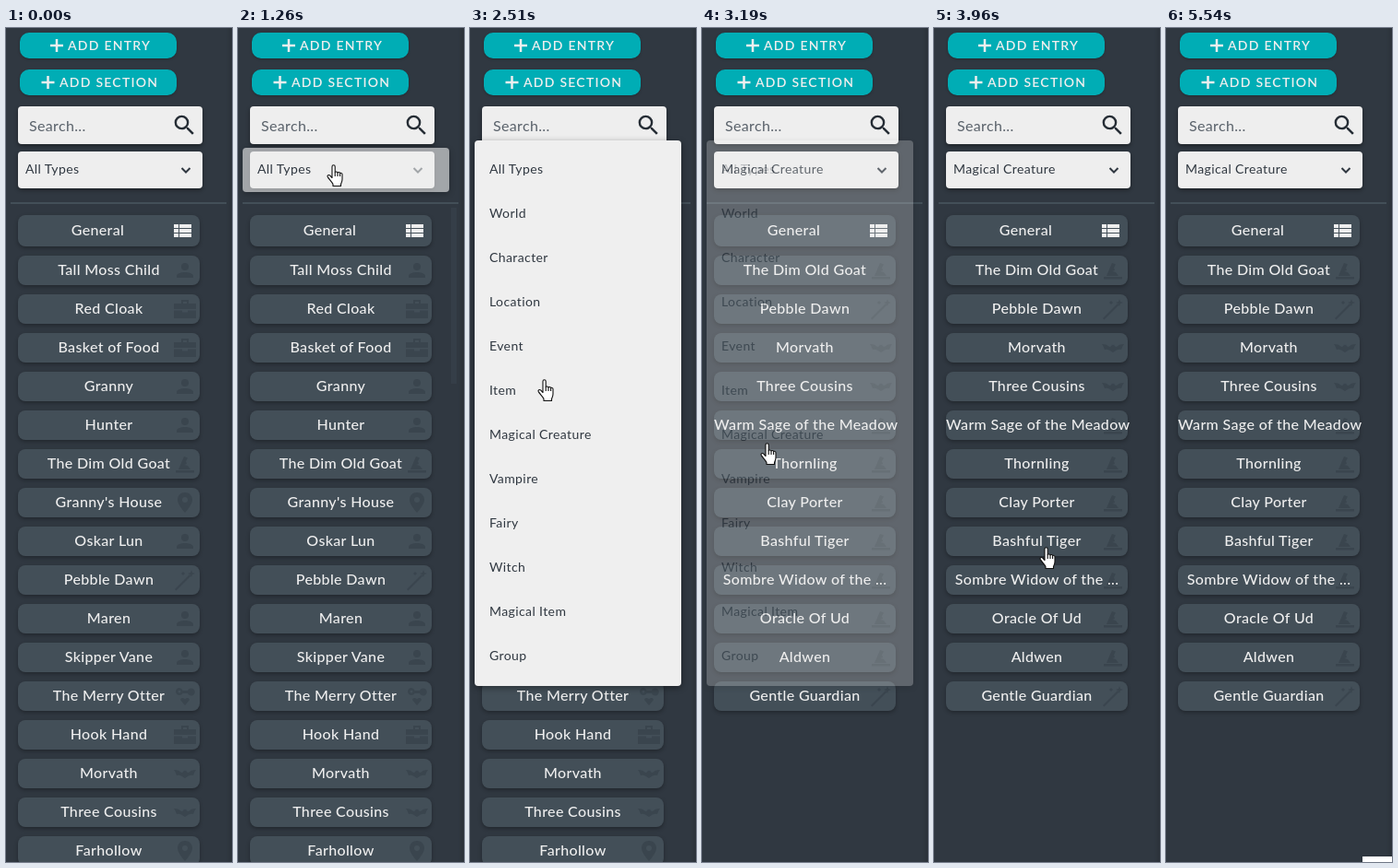
These frames come from a looping animation (245x905 px, 5.59 s). An HTML page:

```html
<!DOCTYPE html>
<html lang="en">
<head>
<meta charset="utf-8">
<title>Entry filter</title>
<style>
html, body { margin: 0; width: 100%; height: 100%; overflow: hidden; background: #303841; }
#stage { position: relative; width: 245px; height: 905px; overflow: hidden; background: #303841;
  box-shadow: inset -5px 0 5px -4px rgba(0,0,0,.2);
  font: 16px Lato, Nunito, sans-serif; letter-spacing: .35px; color: #eee; white-space: nowrap; }
#stage div, #stage svg { position: absolute; box-sizing: border-box; }
svg { overflow: visible; }
.btn { left: 15px; width: 170px; height: 28px; border-radius: 10px; background: #00adb5;
  font-size: 14px; font-weight: 600; letter-spacing: 1.25px; line-height: 27px;
  box-shadow: 0 1px 3px rgba(0,0,0,.25); }
.field { left: 13px; width: 200px; background: #eee; border-radius: 4px; color: #303841;
  box-shadow: 0 2px 4px rgba(0,0,0,.4); }
.small { font-size: 14px; letter-spacing: .4px; }
.row { left: 13px; width: 197px; height: 32px; border-radius: 8px; background: #434f58;
  text-align: center; line-height: 30px; font-weight: 500; box-shadow: 0 2px 4px rgba(0,0,0,.3); }
.row svg { left: 169px; top: 4px; fill: #3a454e; }
.row span { position: relative; }
#rule { left: 5px; top: 189px; width: 234px; height: 2px; background: #434f58; }
#thumb { left: 231px; top: 195px; width: 6px; height: 191px; background: #353e48; }
#menu { left: 5px; width: 224px; overflow: hidden; background: #efefef; border-radius: 4px;
  color: #303841; box-shadow: 0 2px 7px rgba(0,0,0,.4); }
#menu .opt { left: 16px; line-height: 46px; height: 48px; }
#tip { left: 213px; top: 899px; width: 40px; height: 20px; background: #fff; }
.cursor { left: 0; top: 0; fill: #fff; stroke: #111; stroke-width: 1.1; stroke-linejoin: round; }
</style>
</head>
<body>
<div id="stage">
  <div class="btn" style="top:5px"><div style="left:52px">ADD ENTRY</div>
    <svg width="170" height="28"><path d="M33 14h14M40 7v14" stroke="#eee" stroke-width="2.5"/></svg></div>
  <div class="btn" style="top:45px"><div style="left:43px">ADD SECTION</div>
    <svg width="170" height="28"><path d="M23.5 14h14M30.5 7v14" stroke="#eee" stroke-width="2.5"/></svg></div>

  <div class="field" style="top:85px;height:41px;line-height:41px;color:#59616a">
    <div style="left:12px">Search...</div>
    <svg style="left:166.4px;top:6px" width="29" height="29" viewBox="0 0 24 24" fill="#262d35"><path d="M15.5 14h-.79l-.28-.27A6.47 6.47 0 0 0 16 9.5 6.5 6.5 0 1 0 9.5 16c1.61 0 3.09-.59 4.23-1.57l.27.28v.79l5 4.99L20.49 19zm-6 0a4.5 4.5 0 1 1 0-9 4.5 4.5 0 0 1 0 9z"/></svg>
  </div>
  <div class="field small" style="top:134px;height:40px;line-height:38px">
    <div id="picked" style="left:8px"></div>
    <svg width="200" height="40"><path d="M177.5 18l4.5 4.5 4.5-4.5" fill="none" stroke="#303841" stroke-width="2"/></svg>
  </div>
  <div id="rule"></div>
  <div id="thumb"></div>

  <div class="row" style="top:203px;height:34px;line-height:32px">
    <div style="width:173px">General</div>
    <svg style="top:10px;fill:#eee" width="20" height="14"><path d="M0 0h5v4H0zM6 0h13v4H6zM0 5h5v4H0zM6 5h13v4H6zM0 10h5v4H0zM6 10h13v4H6z"/></svg>
  </div>
  <div id="all"></div>
  <div id="filtered"></div>

  <div id="menu" class="small"><div id="options"></div></div>
  <svg id="hand" class="cursor" width="18" height="24"><path d="M6 14.5V2.4a1.6 1.6 0 0 1 3.2 0V8.6c.4-1 2.6-.8 2.8.4.5-.9 2.4-.6 2.6.6.6-.6 2.4-.3 2.4 1.2V16c0 3-1 4-1.5 5.5v2H7v-2C6 19 3.5 17 1.2 13.6c-.8-1.6 1.2-2.8 2.6-1.4z"/><path d="M9.2 8.5v4.5M12 9v4M14.6 9.8v3.2" fill="none"/></svg>
  <svg id="arrow" class="cursor" width="12" height="20"><path d="M.5.5v15l3.6-3.3 2.6 6.3 2.2-1-2.6-6h5z"/></svg>
  <div id="tip"></div>
</div>
<script>
const $ = id => document.getElementById(id);
const LOOP = 5590, TICK = 77.5, START = 310;

const icons = {
  person: 'M12 12a4 4 0 1 0 0-8 4 4 0 0 0 0 8zm0 2c-3.4 0-9 1.3-9 4v2h18v-2c0-2.7-5.6-4-9-4z',
  bag: 'M8 6V2h8v4h8v6H0V6zm2 0h4V4h-4zM0 13.5h9v2h6v-2h9V22H0z',
  hat: 'M2 19h20v2.5H2zM5 18l6-14 4 1.5-2 3.5 1 3-3 1 4 1 3 4z',
  pin: 'M12 1C7.5 1 4 4.5 4 9c0 5.5 8 14 8 14s8-8.5 8-14c0-4.5-3.5-8-8-8zm0 11a3 3 0 1 1 0-6 3 3 0 0 1 0 6z',
  wand: 'M1 22L17 6l1.5 1.5L2.5 23.5zM19 1l1 3 3 1-3 1-1 3-1-3-3-1 3-1zM10 3l2 2-2 2-2-2z',
  crew: 'M6 3a4 4 0 1 0 3.5 6H15a4 4 0 1 0 0-3H9.5A4 4 0 0 0 6 3zm0 2.5a1.5 1.5 0 1 1 0 3 1.5 1.5 0 0 1 0-3zM12 22l-5-6c1-3 4-2 5-.5 1-1.5 4-2.5 5 .5z',
  bat: 'M0 8c4 0 6 1 8 3l2-.5 1-2 1 1 1-1 1 2 2 .5c2-2 4-3 8-3-2 2-2 4-3 6-3-1-5 0-9 3-4-3-6-4-9-3-1-2-1-4-3-6z'
};

const allRows = [
  ['Tall Moss Child', 'person'], ['Red Cloak', 'bag'], ['Basket of Food', 'bag'],
  ['Granny', 'person'], ['Hunter', 'person'], ['The Dim Old Goat', 'hat'],
  ["Granny's House", 'pin'], ['Oskar Lun', 'person'], ['Pebble Dawn', 'wand'],
  ['Maren', 'person'], ['Skipper Vane', 'person'], ['The Merry Otter', 'crew'],
  ['Hook Hand', 'bag'], ['Morvath', 'bat'], ['Three Cousins', 'bat'], ['Farhollow', 'pin']
];
const magicRows = [
  ['The Dim Old Goat', 'hat'], ['Pebble Dawn', 'wand'], ['Morvath', 'bat'],
  ['Three Cousins', 'bat'], ['Warm Sage of the Meadow', 'hat'], ['Thornling', 'hat'],
  ['Clay Porter', 'hat'], ['Bashful Tiger', 'hat'], ['Sombre Widow of the ...', 'hat'],
  ['Oracle Of Ud', 'hat'], ['Aldwen', 'hat'], ['Gentle Guardian', 'wand']
];
const types = ['All Types', 'World', 'Character', 'Location', 'Event', 'Item',
  'Magical Creature', 'Vampire', 'Fairy', 'Witch', 'Magical Item', 'Group'];

const rowHtml = ([name, icon], i) =>
  `<div class="row" style="top:${247 + 42 * i}px"><svg width="24" height="24"><path fill-rule="evenodd" d="${icons[icon]}"/></svg><span>${name}</span></div>`;
$('all').innerHTML = allRows.map(rowHtml).join('');
$('filtered').innerHTML = magicRows.map(rowHtml).join('');
$('options').innerHTML = types.map((t, i) => `<div class="opt" style="top:${48 * i}px">${t}</div>`).join('');

// Pointer tip: tick, x, y
const path = [
  [0, 222, 240], [4, 150, 118], [7, 106, 138], [8, 104, 144], [12, 103, 148], [16, 106, 150],
  [17, 100, 158], [23, 91, 285], [28, 80, 381], [31, 72, 433], [32, 70, 450], [39, 70, 450],
  [40, 72, 456], [47, 121, 563], [55, 201, 775], [56, 202, 779], [61, 218, 906]
];
// Menu: tick, top, height, opacity
const menuSteps = [
  [0, 130, 48, 0], [12, 130, 48, .6], [13, 125, 400, .9], [14, 122, 592, 1],
  [36, 122, 592, .7], [37, 122, 592, .25], [38, 122, 592, 0]
];

function tipAt(n) {
  const i = path.findIndex(p => p[0] >= n);
  if (i < 0) return path[path.length - 1].slice(1);
  if (i === 0) return path[0].slice(1);
  const [a, b] = [path[i - 1], path[i]];
  const k = (n - a[0]) / (b[0] - a[0]);
  return [1, 2].map(j => Math.round(a[j] + (b[j] - a[j]) * k));
}

const show = (id, on) => { $(id).style.visibility = on ? 'visible' : 'hidden'; };

function draw(t) {
  const n = Math.floor((t - START) / TICK);
  const filtered = n >= 36;
  show('all', !filtered);
  show('filtered', filtered);
  $('picked').textContent = filtered ? 'Magical Creature' : 'All Types';
  show('thumb', n >= 0 && n < 13);
  show('tip', n >= 67);

  const [, top, height, opacity] = menuSteps.filter(s => s[0] <= Math.max(n, 0)).pop();
  Object.assign($('menu').style, { top: top + 'px', height: height + 'px', opacity });
  $('options').style.top = 130 - top + 'px';

  const [x, y] = tipAt(n);
  const inside = n >= 0 && n < 61;
  const isArrow = y < 134 || y > 741;
  show('hand', inside && !isArrow);
  show('arrow', inside && isArrow);
  $('hand').style.transform = `translate(${x - 7}px, ${y}px)`;
  $('arrow').style.transform = `translate(${x}px, ${y}px)`;
}

const t0 = performance.now();
function loop() {
  draw((performance.now() - t0) % LOOP);
  requestAnimationFrame(loop);
}
loop();
</script>
</body>
</html>
```
